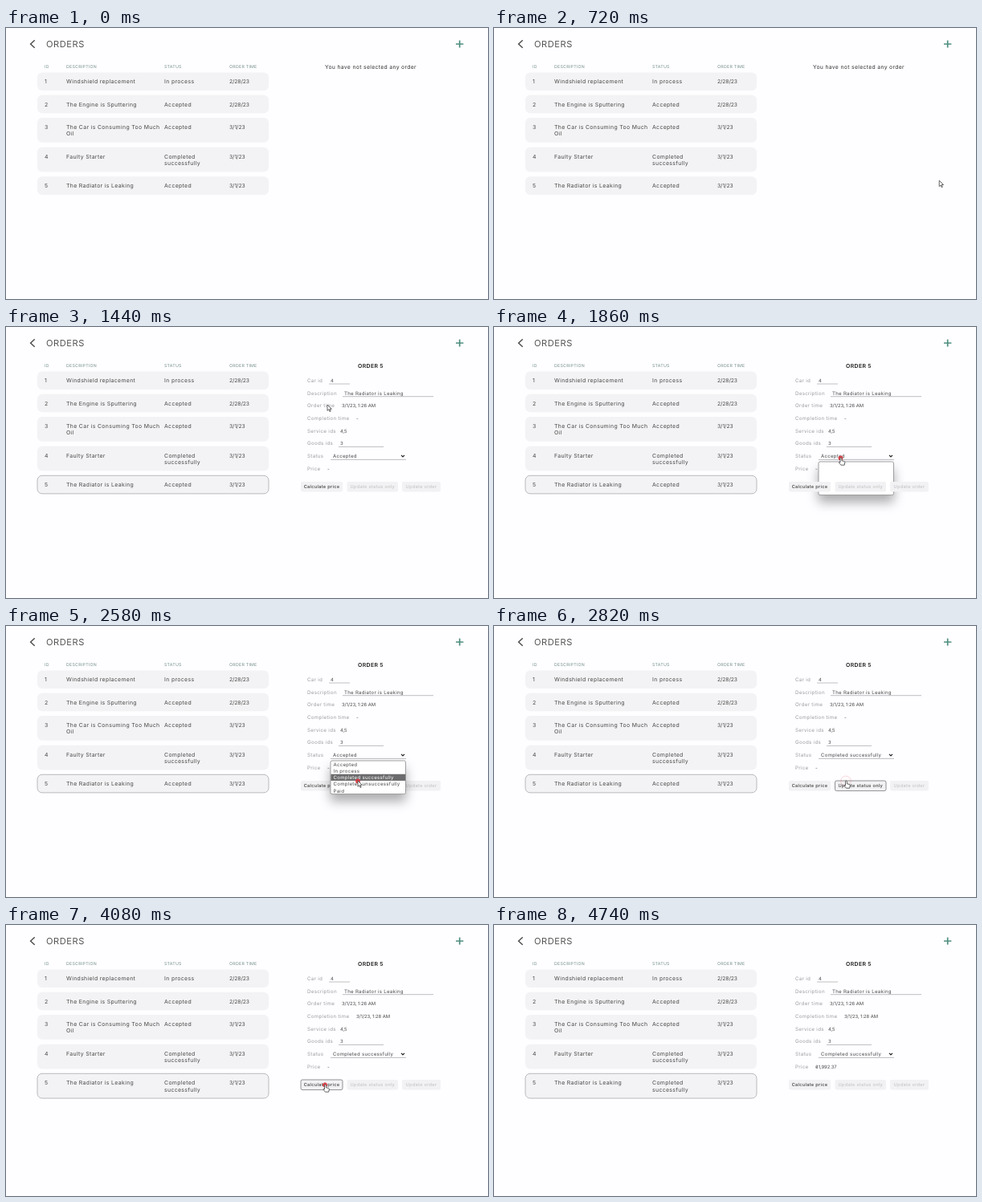
An HTML page that plays this animation: 600x338 px, repeating every 5280 ms.

```html
<!DOCTYPE html>
<html lang="en">
<head>
<meta charset="utf-8">
<title>Orders</title>
<style>
  html, body { margin: 0; width: 100%; height: 100%; overflow: hidden; background: #fefdff; }
  svg { display: block; width: 100%; height: 100%; }
  text { font-family: Inter, "Open Sans", sans-serif; letter-spacing: .05em; text-rendering: geometricPrecision; }
  .num { letter-spacing: -.01em; }
  .bold { font-weight: 600; }
  .medium { font-weight: 500; }
  .mid { text-anchor: middle; }
  .menu { filter: drop-shadow(0 9px 7px rgba(0, 0, 0, .32)); }
</style>
</head>
<body>
<svg id="stage" viewBox="0 0 600 338"></svg>
<script>
const LOOP = 5280, STEP = 60;
const INK = '#484848', GREY = '#9b9b9f', GREEN = '#728f88';
const stage = document.getElementById('stage');

// Moments at which the interface changes
const T = { enter: 660, select: 1080, fields: 1140, menu: 1860, options: 1920,
            chosen: 2640, saved: 3240, price: 4200, leave: 4740 };
const CLICKS = [1020, 1860, 2580, 3120, 4080];

// Pointer stops: time, x, y
const PATH = [
  [660, 574, 190], [1020, 307, 193], [1140, 307, 193], [1440, 400, 97],
  [1680, 431.5, 163], [1860, 431.5, 163], [2280, 438, 193], [3000, 438, 193],
  [3120, 451, 201], [3540, 451, 201], [3780, 397, 199], [4560, 397, 199], [4680, 560, 232]
];

const STATUSES = ['Accepted', 'In process', 'Completed successfully',
                  'Completed unsuccessfully', 'Paid'];

function text(x, y, s, size = 6.9, fill = INK, cls = '') {
  return `<text x="${x}" y="${y}" font-size="${size}" fill="${fill}" class="${cls}">${s}</text>`;
}
function rect(x, y, w, h, r, fill, stroke = 'none', width = .8) {
  return `<rect x="${x}" y="${y}" width="${w}" height="${h}" rx="${r}" fill="${fill}" stroke="${stroke}" stroke-width="${width}"/>`;
}
function line(d, stroke, width) {
  return `<path d="${d}" fill="none" stroke="${stroke}" stroke-width="${width}"/>`;
}

function pointerAt(t) {
  const i = PATH.findIndex(p => p[0] > t);
  if (i < 0) return PATH[PATH.length - 1].slice(1);
  if (i === 0) return PATH[0].slice(1);
  const [t0, x0, y0] = PATH[i - 1], [t1, x1, y1] = PATH[i];
  let k = (t - t0) / (t1 - t0);
  k *= k * (3 - 2 * k);
  return [x0 + (x1 - x0) * k, y0 + (y1 - y0) * k];
}

function header() {
  return line('M35.7 15.2L30.6 20L35.7 24.8', '#505050', 1.5)
    + text(50, 24, 'ORDERS', 11.1, '#555')
    + line('M560 20H569.4M564.7 15.4V24.6', '#4f8f80', 1.7)
    + [[48, 'ID'], [75, 'DESCRIPTION'], [197, 'STATUS'], [278, 'ORDER TIME']]
        .map(([x, s]) => text(x, 49.7, s, 5.25, GREEN)).join('');
}

function table(t) {
  const done = ['Completed', 'successfully'];
  const rows = [
    [55.5, ['Windshield replacement'], ['In process'], '2/28/23'],
    [83.7, ['The Engine is Sputtering'], ['Accepted'], '2/28/23'],
    [112, ['The Car is Consuming Too Much', 'Oil'], ['Accepted'], '3/1/23'],
    [148.8, ['Faulty Starter'], done, '3/1/23'],
    [185.3, ['The Radiator is Leaking'], t >= T.saved ? done : ['Accepted'], '3/1/23']
  ];
  return rows.map(([y, name, status, date], i) => {
    const tall = name.length + status.length > 2;
    const border = i === 4 && t >= T.select ? '#aaaaae' : 'none';
    const cell = (x, lines) => lines.map((s, n) => text(x, y + 13.9 + n * 8.3, s)).join('');
    return rect(39, y, 288, tall ? 30.8 : 22.6, 6, '#f3f2f4', border)
      + cell(48, [i + 1]) + cell(75, name) + cell(197, status)
      + text(278, y + 13.9, date, 6.7, INK, 'num');
  }).join('');
}

function panel(t) {
  if (t < T.select) return text(454, 51, 'You have not selected any order', 6.8, '#333', 'mid');
  const title = text(454, 51, 'ORDER 5', 6.9, '#222', 'mid bold');
  if (t < T.fields) return title;

  const saved = t >= T.saved;
  const fields = [
    ['Car id', 404, '4', 'num'],
    ['Description', 421, 'The Radiator is Leaking'],
    ['Order time', 418, '3/1/23, 1:26 AM', 'num'],
    ['Completion time', 436, saved ? '3/1/23, 1:28 AM' : '-', 'num'],
    ['Service ids', 416, '4,5', 'num'],
    ['Goods ids', 416, '3', 'num'],
    ['Status', 407, STATUSES[t >= T.chosen ? 2 : 0]],
    ['Price', 400, t >= T.price ? '₴1,992.37' : '-', 'num']
  ];
  return title + fields.map(([label, x, value, cls = ''], i) => {
    const y = 68.8 + i * 15.7;
    return text(375, y, label, 6.2, GREY) + text(x, y, value, cls ? 5.85 : 6.05, INK, cls);
  }).join('')
    + line('M402 71H428M419 86.7H532M414 149.4H470M404 165.4H498', '#a4a4a8', .7)
    + line('M492 159.8L494 161.9L496 159.8', '#222', 1.2);
}

function button(x, w, label, on, hover) {
  return rect(x, 193, w, 12.6, 2, '#f2f1f3', on && hover ? '#77777a' : 'none')
    + text(x + w / 2, 201.4, label, 5.65, on ? '#404040' : '#c6c6c8', 'mid medium');
}

function buttons(t, over) {
  if (t < T.fields) return '';
  const canUpdate = t >= T.chosen && t < T.saved;
  return button(367, 52, 'Calculate price', true, over(367, 193, 52, 13))
    + button(424.5, 63.5, 'Update status only', canUpdate, over(424, 192, 64, 14))
    + button(493, 48, 'Update order', false);
}

function menuBox(t) {
  if (t < T.menu || t >= T.chosen) return '';
  return `<g class="menu">${rect(404, 168, 93.5, 41.6, 2, '#fff', '#8a8a8c')}</g>`;
}

function menuItems(t, y) {
  if (t < T.options || t >= T.chosen) return '';
  const active = Math.max(0, Math.min(2, Math.floor((y - 168) / 8.3)));
  return STATUSES.map((s, i) => {
    const top = 168.2 + i * 8.28, on = i === active;
    return (on ? rect(404.4, top, 92.7, 8.2, 0, '#6b6b6d') : '')
      + text(407.5, top + 6.3, s, 6.05, on ? '#fff' : INK);
  }).join('');
}

function ripple(t, x, y) {
  const start = CLICKS.find(c => t >= c && t < c + 300);
  if (start === undefined) return '';
  const k = (t - start) / 300;
  return `<circle cx="${x}" cy="${y + .4}" r="${2.5 + 6 * k * (1 - k / 4)}" fill="#e0343c" stroke="#d8323a"`
    + ` fill-opacity="${.85 * (1 - k) ** 3}" stroke-opacity="${1 - k}" stroke-width=".9"/>`;
}

function pointer(t, x, y, over) {
  if (t < T.enter || t >= T.leave) return '';
  const open = t >= T.options && t < T.chosen;
  const hand = !open && (over(39, 185, 288, 23) || over(404, 155, 94, 11)
    || over(367, 193, 52, 13) || (t >= T.chosen && t < T.saved && over(424, 192, 64, 14)));
  const shape = hand
    ? 'M.3 0c.8 0 1.1.5 1.1 1.1v2.7l2.7.6c.9.2 1.3.7 1.2 1.6l-.6 3.2h-4.3l-2.6-3.2c.3-.8 1.2-.7 1.7 0v-4.9c0-.6.3-1.1.8-1.1z'
    : 'M0 0v7.4l1.7-1.6 1.3 2.7 1.2-.5-1.3-2.7h2.4z';
  return `<path transform="translate(${x} ${y})" d="${shape}" fill="#fff" stroke="#333" stroke-width=".75" stroke-linejoin="round"/>`;
}

function render(t) {
  const [x, y] = pointerAt(t);
  const over = (left, top, w, h) => x >= left && x <= left + w && y >= top && y <= top + h
    && t >= T.enter && t < T.leave;
  // The menu opens beneath the buttons and covers them once its items are drawn
  const layers = [menuBox(t), buttons(t, over)];
  if (t >= T.options) layers.reverse();
  stage.innerHTML = header() + table(t) + panel(t) + layers.join('') + menuItems(t, y)
    + ripple(t, x, y) + pointer(t, x, y, over);
}

let shown = -1;
const origin = performance.now();
function tick() {
  const t = Math.floor((performance.now() - origin) % LOOP / STEP) * STEP;
  if (t !== shown) render(shown = t);
  requestAnimationFrame(tick);
}
tick();
</script>
</body>
</html>
```
